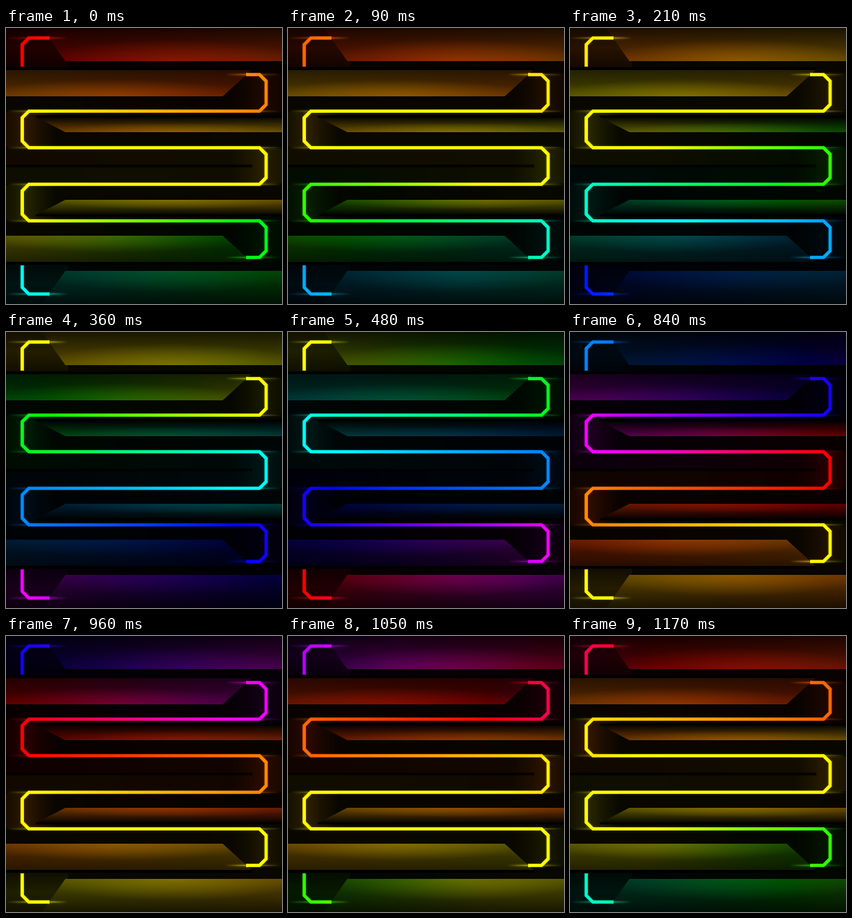
An HTML page with a canvas that plays this animation: 400 px wide and 400 px high, repeating every 1.2 s.

```html
<!DOCTYPE html>
<html>
<head>
<meta charset="utf-8">
<style>
html, body { margin: 0; width: 100%; height: 100%; overflow: hidden; background: #000; }
canvas { display: block; width: 400px; height: 400px; }
</style>
</head>
<body>
<canvas id="stage" width="400" height="400"></canvas>
<script>
const SIZE = 400, LOOP = 1200, STEP = 30, TAU = Math.PI * 2;
const LEFT = 23.5, RIGHT = 377, CUT = 9.5;
const lineY = k => 14.5 + 53 * k;

// red to yellow, a rest on yellow, then round the wheel back to red
function hue(p, slope) {
  if (p < .4) return Math.min(60, slope * p);
  const q = (p - .4) / .6;
  return 60 + 300 * q + 18 * Math.sin(TAU * q);
}

const tubeColor = p => `hsl(${hue(p, 300)},100%,50%)`;
const panelColor = p => `hsl(${hue(p, 155)},100%,${25 + 9 * Math.cos(TAU * (p - .18))}%)`;

function layer() {
  const c = document.createElement('canvas');
  c.width = c.height = SIZE;
  return c.getContext('2d');
}

const white = a => `rgba(255,255,255,${a})`;

// gradient with evenly spaced opacities
function ramp(g, x0, y0, x1, y1, alphas) {
  const r = g.createLinearGradient(x0, y0, x1, y1);
  alphas.forEach((a, i) => r.addColorStop(i / (alphas.length - 1), white(a)));
  return r;
}

function trace(g, pts) {
  g.beginPath();
  pts.forEach(([x, y]) => g.lineTo(x, y));
}

function rect(g, x, y, w, h, style) {
  g.fillStyle = style;
  g.fillRect(x, y, w, h);
}

// panel that brightens from y0 to its edge y1, most of all around cx
function lit(g, pts, y0, y1, low, cx) {
  trace(g, pts);
  g.fillStyle = '#000';
  g.fill();
  g.fillStyle = ramp(g, 0, y0, 0, y1, [low, .36, .58]);
  g.fill();
  g.save();
  g.translate(cx, y1);
  g.scale(195, (y1 - y0) * .65);
  const glow = g.createRadialGradient(0, 0, 0, 0, 0, 1);
  glow.addColorStop(0, white(.6));
  glow.addColorStop(.5, white(.32));
  glow.addColorStop(1, white(0));
  g.fillStyle = glow;
  g.fill();
  g.restore();
}

function bendGlow(g, x, dir, y, h, a) {
  rect(g, dir > 0 ? x : x - 50, y, 50, h, ramp(g, x, 0, x + 50 * dir, 0, [a, a * .4, 0]));
  rect(g, dir > 0 ? 0 : x, y, 24, h, ramp(g, x, 0, x - 24 * dir, 0, [a * .7, a * .3]));
}

function panels(g) {
  rect(g, 0, 0, SIZE, 200, white(.05));
  rect(g, 0, 0, 90, 57, ramp(g, 0, 0, 0, 57, [.08, .18, .06]));
  lit(g, [[52, 0], [400, 0], [400, 48], [86, 48]], 0, 48, .16, 240);
  rect(g, 0, 57, 357, 4, '#000');

  lit(g, [[0, 61], [356, 61], [314, 99], [0, 99]], 61, 99, .24, 160);
  bendGlow(g, RIGHT, -1, 69, 49, .16);

  bendGlow(g, LEFT, 1, 122, 50, .27);
  lit(g, [[45, 130], [400, 130], [400, 151], [86, 151]], 130, 151, .06, 240);
  rect(g, 43, 127, 357, 3, 'rgba(0,0,0,.8)');

  rect(g, 0, 175, SIZE, 25, white(.05));
  bendGlow(g, RIGHT, -1, 175, 25, .2);
  rect(g, 0, 198, 357, 2, ramp(g, 0, 0, 357, 0, [0, 0]));
  rect(g, 0, 198, 357, 2, 'rgba(0,0,0,.8)');
}

// the lower half mirrors the upper one
function panelMask() {
  const half = layer(), g = layer();
  panels(half);
  rect(g, 0, 0, SIZE, SIZE, '#000');
  for (const dir of [1, -1]) {
    g.setTransform(1, 0, 0, dir, 0, dir > 0 ? 0 : SIZE);
    g.drawImage(half.canvas, 0, 0, SIZE, 200, 0, 0, SIZE, 200);
  }
  return g.canvas;
}

function bend(k) {
  const [x, dir] = k % 2 ? [RIGHT, -1] : [LEFT, 1];
  const top = lineY(k), bottom = lineY(k + 1), inner = x + CUT * dir;
  return [[inner, top], [x, top + CUT], [x, bottom - CUT], [inner, bottom]];
}

function streak(g, x0, x1, y, a) {
  for (const [h, k] of [[6, .2], [2, 1]])
    rect(g, Math.min(x0, x1), y - h / 2, Math.abs(x1 - x0), h, ramp(g, x0, 0, x1, 0, [a * k, 0]));
}

function tubeMask() {
  const g = layer();
  rect(g, 0, 0, SIZE, SIZE, '#000');
  for (let k = 0; k < 8; k++) {
    const y = lineY(k), side = k % 7 ? 1 : 0;
    if (k !== 1 && k !== 6) streak(g, 30, 0, y, .34);
    if (side) streak(g, 370, 400, y, .34);
  }
  for (const k of [0, 7]) streak(g, 62, 90, lineY(k), .45);
  for (const k of [1, 6]) streak(g, 349, 318, lineY(k), .45);

  const stub = [[LEFT, 56], [LEFT, lineY(0) + CUT], [LEFT + CUT, lineY(0)], [63, lineY(0)]];
  const snake = [[348, lineY(1)], ...[1, 2, 3, 4, 5].flatMap(bend), [348, lineY(6)]];
  for (const pts of [stub, snake, stub.map(([x, y]) => [x, SIZE - y])]) {
    trace(g, pts);
    for (const [w, a] of [[8, .06], [4.6, 1]]) {
      g.lineWidth = w;
      g.strokeStyle = white(a);
      g.stroke();
    }
  }
  return g.canvas;
}

// six bands follow the tube to and fro, a tenth of the cycle each
function paint(g, shade, color, time) {
  g.globalCompositeOperation = 'source-over';
  for (let k = 0; k < 6; k++) {
    const left = .2 * Math.ceil(k / 2), right = .1 + .2 * Math.floor(k / 2);
    const r = g.createLinearGradient(24, 0, 376, 0);
    for (let u = 0; u <= 1; u += 1 / 16)
      r.addColorStop(u, color((left + (right - left) * u + time) % 1));
    rect(g, 0, 70 * k - 10, SIZE, 70, r);
  }
  rect(g, 0, 410, SIZE, 0, '#000');
  g.globalCompositeOperation = 'multiply';
  g.drawImage(shade, 0, 0);
}

const panelShade = panelMask(), tubeShade = tubeMask();
const back = layer();
const front = document.getElementById('stage').getContext('2d');

function render(now) {
  const time = Math.floor((now % LOOP) / STEP) * STEP / LOOP;
  paint(back, panelShade, panelColor, time);
  paint(front, tubeShade, tubeColor, time);
  front.globalCompositeOperation = 'lighter';
  front.drawImage(back.canvas, 0, 0);
}

function tick() {
  render(performance.now());
  requestAnimationFrame(tick);
}
tick();
</script>
</body>
</html>
```
